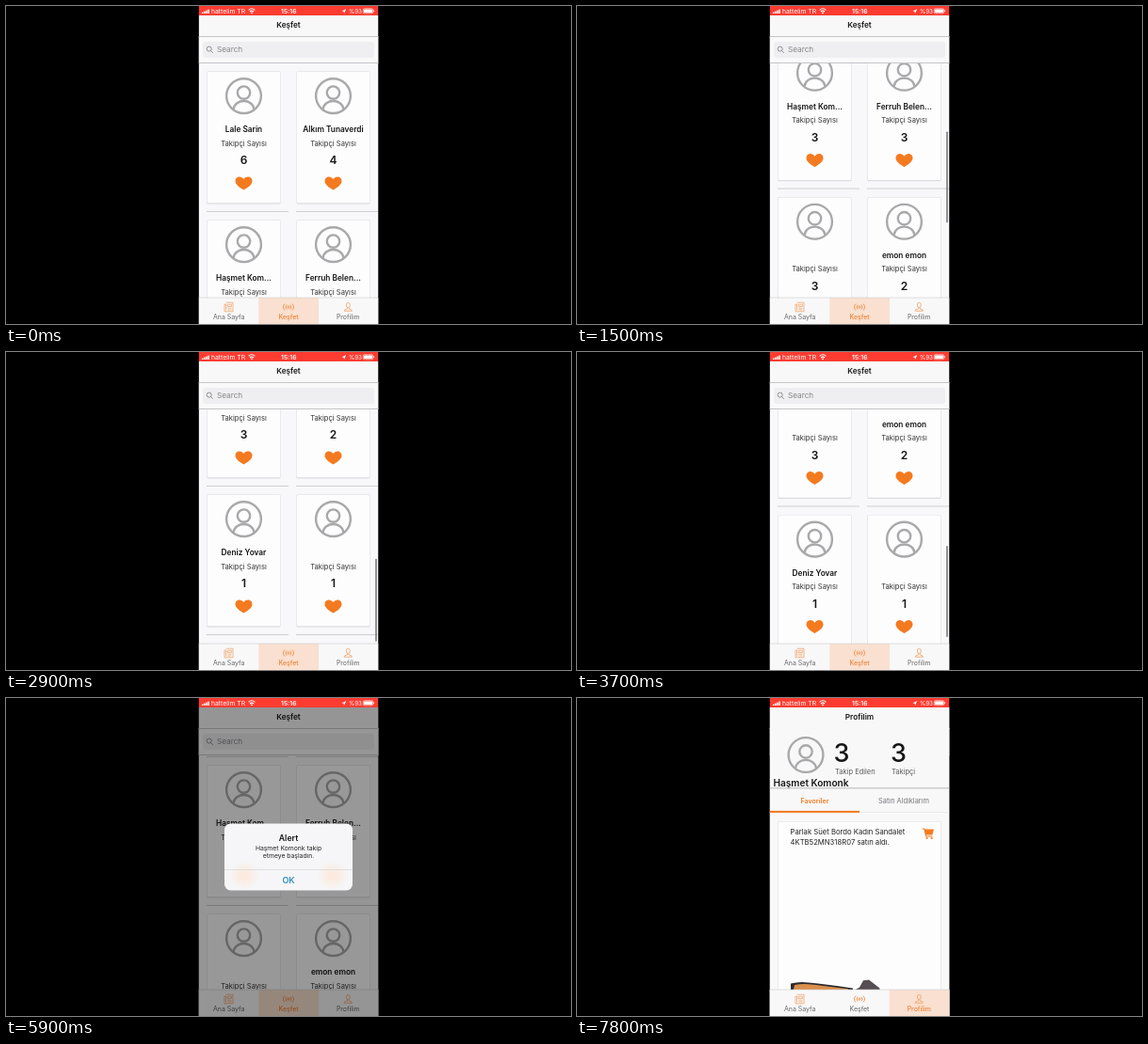
An HTML page that plays this animation: 600 px wide and 338 px high, repeating every 8 s.

```html
<!DOCTYPE html>
<html lang="tr">
<head>
<meta charset="utf-8">
<title>Keşfet</title>
<style>
  html, body { margin: 0; width: 100%; height: 100%; overflow: hidden; background: #000; }
  svg { display: block; width: 600px; height: 338px; font-family: Inter, "Open Sans", sans-serif; }
</style>
</head>
<body>
<svg id="stage" viewBox="0 0 600 338" xmlns="http://www.w3.org/2000/svg"></svg>
<script>
const LOOP = 8000, STEP = 100;
const LEFT = 204.6, WIDTH = 190.9;
const ORANGE = '#f47a1f', INK = '#161616', GRAY = '#5c5c5e', LINE = '#c0c0c2';
const MAX_SCROLL = 383, ROW = 158;
const SCROLL = [[0, 0], [200, 0], [1000, 81], [2000, 287], [2900, 392], [3300, 383], [3600, 383], [4300, 156], [8000, 156]];
const ALERT_IN = 5200, ALERT_OUT = 6300, PROFILE_AT = 7000;

const people = [
  ['Lale Sarin', 6], ['Alkım Tunaverdi', 4],
  ['Haşmet Kom...', 3], ['Ferruh Belen...', 3],
  ['', 3], ['emon emon', 2],
  ['Deniz Yovar', 1], ['', 1]
];

const text = (x, y, s, size, fill = INK, weight = 400, anchor = 'middle') =>
  `<text x="${x}" y="${y}" font-size="${size}" fill="${fill}" font-weight="${weight}" text-anchor="${anchor}">${s}</text>`;
const rect = (x, y, w, h, fill, extra = '') =>
  `<rect x="${x}" y="${y}" width="${w}" height="${h}" fill="${fill}" ${extra}/>`;
const band = (y, h, fill, extra) => rect(LEFT, y, WIDTH, h, fill, extra);
const path = (d, extra = '') => `<path d="${d}" ${extra}/>`;
const group = (body, extra = '') => `<g ${extra}>${body}</g>`;

const avatar = (x, y) => group(
  `<circle r="18.4"/><circle cy="-3.5" r="6.7"/>` + path('M-11 14.4C-9.6 2.4 9.6 2.4 11 14.4'),
  `transform="translate(${x} ${y})" fill="none" stroke="#a9a9ab" stroke-width="2.4"`);

const heart = (x, y) => path(
  'M0 7.2C-4.4 4.6 -9 1.6 -9 -2.4C-9 -7.4 -2.8 -8.4 0 -4.2C2.8 -8.4 9 -7.4 9 -2.4C9 1.6 4.4 4.6 0 7.2Z',
  `transform="translate(${x} ${y})" fill="${ORANGE}"`);

const cardBox = (x, y, w, h) =>
  rect(x - .5, y - .4, w + 1, h + 1.6, '#dcdbdf', 'rx="1.2"') + rect(x, y, w, h, '#fdfdfe', 'rx="1"');

function personCard([name, count], i) {
  const right = i % 2, x = right ? 309 : 214, y = 70 + (i >> 1) * ROW, mid = x + 38.5;
  return cardBox(x, y, 77, 139.3) + avatar(mid, y + 25.6) +
    text(mid, y + 64, name, 8.3, INK, 600) +
    text(mid, y + 78.8, 'Takipçi Sayısı', 7.6, '#333') +
    text(mid, y + 98, count, 12, INK, 600) + heart(mid, y + 118.3) +
    rect(right ? 308 : 213, y + 148, 87, .9, '#cacacc');
}

function statusBar() {
  const bars = [0, 1, 2, 3].map(i => rect(208 + i * 2.1, 6.6 - i, 1.5, 1.4 + i, '#fff')).join('');
  const wifi = path('M257.6 4.3Q261 1.2 264.4 4.3M259 6Q261 4.2 263 6', 'fill="none" stroke="#fff" stroke-width="1.1"') +
    '<circle cx="261" cy="7.3" r=".9" fill="#fff"/>';
  const battery = rect(379.3, 2.8, 10.4, 5, 'none', 'rx="1.2" stroke="#fff" stroke-width=".6"') +
    rect(380, 3.5, 9, 3.6, '#fff', 'rx=".6"') + rect(390.2, 4.4, .9, 1.8, '#fff');
  return band(0, 10, '#fc3c31') + bars + wifi + battery +
    text(218, 7.7, 'hattelim TR', 6.8, '#fff', 400, 'start') +
    text(300.3, 7.7, '15:16', 6.8, '#fff', 600) +
    path('M356.5 5.4L361.3 3L359 8L358.6 5.7Z', 'fill="#fff"') +
    text(364, 7.7, '%93', 6.3, '#fff', 400, 'start');
}

const navBar = title => band(10, 22.5, '#f8f8f9') + text(300, 23.2, title, 8.2, INK, 600);

const searchBar = () =>
  band(32, 29, '#f9f9fa') + band(32, .9, LINE) +
  rect(209, 38, 182, 17, '#efeef0', 'rx="3"') +
  `<circle cx="215.7" cy="45.6" r="2.5" fill="none" stroke="#858589" stroke-width=".9"/>` +
  path('M217.6 47.6L219.8 49.9', 'stroke="#858589" stroke-width=".9"') +
  text(224, 49.4, 'Search', 8.2, '#858589', 400, 'start') +
  band(60, .9, LINE);

function tabBar(active) {
  const icons = [
    path('M233.7 315.2H241V324.8H232V317H233.7V323.5M235.3 317.2H239.4V319.4H235.3ZM235.3 321.2H239.4M235.3 323H239.4', 'stroke-width=".7"'),
    path('M296 316.6Q292.8 320 296 323.4M304 316.6Q307.2 320 304 323.4M298 317.6Q296 320 298 322.4M302 317.6Q304 320 302 322.4', 'stroke-width="1"') +
      '<circle cx="300" cy="320" r="1.1" stroke-width="1"/>',
    '<ellipse cx="363.3" cy="317.9" rx="2" ry="2.6"/>' +
      path('M362.5 320.4V321.8L359.4 323V324.2H367.2V323L364.1 321.8V320.4')
  ];
  const labels = ['Ana Sayfa', 'Keşfet', 'Profilim'];
  return band(310, 28, '#f8f8f9') +
    rect(205 + active * 63.35, 310, 63.8, 28, '#f9e0d0') +
    band(309.7, .6, '#c9c9cb') +
    group(icons.join(''), 'fill="none" stroke="#f19a58" stroke-width=".75"') +
    labels.map((s, i) => text(236.7 + i * 63.3, 333.3, s, 6.95, i === active ? '#ee8438' : '#666668', i === active ? 500 : 400)).join('');
}

const explore = () => band(32, 306, '#f8f7f9') +
  group(people.map(personCard).join(''), 'id="list"') +
  rect(392.2, 63, 1.6, 97, '#77777b', 'id="bar" rx=".8"') +
  navBar('Keşfet') + searchBar() + tabBar(1);

const alertBox = () => band(10, 328, '#000', 'id="dim"') + group(
  rect(232, 133.5, 136, 71, '#f6f6f8', 'rx="6.5"') +
  rect(236, 173, 34, 31, 'url(#glow)') + rect(330, 173, 34, 31, 'url(#glow)') +
  text(300, 151.7, 'Alert', 8.7, INK, 600) +
  text(300, 162, 'Haşmet Komonk takip', 6.8, '#222') +
  text(300, 170, 'etmeye başladın.', 6.8, '#222') +
  rect(232, 182, 136, .6, '#d3d3d6') +
  text(300, 197, 'OK', 9, '#2f8fb8', 600), 'id="alert"');

const cart = () => group(
  path('M366.8 138.4H369.2L369.6 139.4H379L377.4 145.6H370.8L371 146.6H377.6V147.5H370.2L368.4 139.4H366.8Z') +
  '<circle cx="371.6" cy="149" r="1.1"/><circle cx="376.7" cy="149" r="1.1"/>', `fill="${ORANGE}"`);

const shoe = () =>
  path('M227 312V303.4Q236 301 246 302.4Q270 305 293 308.6V312Z', 'fill="#2e2a2e"') +
  path('M229.5 312L231 305Q240 303 252 304.8L288 309.2V312Z', 'fill="#d98f4c"') +
  path('M292 312L300 307.4L304 300.2L310 299.6L321.5 308.6V312Z', 'fill="#554e53"');

const profile = () => band(32, 306, '#f8f8f9') + navBar('Profilim') + avatar(243, 60.5) +
  text(272.6, 67.9, '3', 27, INK, 500, 'start') + text(333, 67.9, '3', 27, INK, 500, 'start') +
  text(274, 81, 'Takip Edilen', 7.5, GRAY, 400, 'start') + text(334, 81, 'Takipçi', 7.5, GRAY, 400, 'start') +
  text(208.5, 93.5, 'Haşmet Komonk', 10.1, INK, 600, 'start') +
  band(95.4, .9, '#b0b0b2') +
  text(252.5, 112, 'Favoriler', 7.1, ORANGE, 600) + text(347, 112, 'Satın Aldıklarım', 7.4, '#77777a') +
  band(121.4, .6, '#e2e2e4') + rect(LEFT, 119.9, 95.4, 2, ORANGE) +
  cardBox(214, 131.4, 172, 200) +
  text(226.5, 145, 'Parlak Süet Bordo Kadın Sandalet', 7.7, '#222', 400, 'start') +
  text(226.5, 155.6, '4KTB52MN318R07 satın aldı.', 7.7, '#222', 400, 'start') +
  cart() + shoe() + tabBar(2);

const $ = id => document.getElementById(id);
$('stage').innerHTML =
  `<defs><clipPath id="screen">${band(0, 338, '#000')}</clipPath>` +
  '<radialGradient id="glow"><stop offset=".2" stop-color="#fbeadd"/><stop offset="1" stop-color="#fbeadd" stop-opacity="0"/></radialGradient></defs>' +
  rect(0, 0, 600, 338, '#000') +
  group(group(explore(), 'id="explore"') + group(alertBox(), 'id="modal"') +
    group(profile(), 'id="profile"') + statusBar(), 'clip-path="url(#screen)"');

const clamp = v => Math.min(1, Math.max(0, v));
const ramp = (t, from, length) => clamp((t - from) / length);
const slope = i => (SCROLL[i + 1][1] - SCROLL[i][1]) / (SCROLL[i + 1][0] - SCROLL[i][0]);

// Smooth speed through each key, without overshoot.
function tangent(i) {
  if (i === 0 || i === SCROLL.length - 1) return 0;
  const a = slope(i - 1), b = slope(i);
  return a * b > 0 ? 2 * a * b / (a + b) : 0;
}

function scrollAt(t) {
  let i = 0;
  while (i < SCROLL.length - 2 && t >= SCROLL[i + 1][0]) i++;
  const [t0, y0] = SCROLL[i], [t1, y1] = SCROLL[i + 1];
  const d = t1 - t0, u = (t - t0) / d, v = 1 - u;
  return y0 * (1 + 2 * u) * v * v + y1 * u * u * (3 - 2 * u) +
    d * (tangent(i) * u * v * v - tangent(i + 1) * u * u * v);
}

function draw(t) {
  const y = scrollAt(t), over = Math.max(0, y - MAX_SCROLL);
  $('list').setAttribute('transform', `translate(0 ${-y.toFixed(2)})`);
  $('bar').setAttribute('y', 63 + (y - over) * .386 + over);
  $('bar').setAttribute('height', 97 - over);
  $('bar').setAttribute('opacity', ramp(t, 100, 200) * (1 - ramp(t, 4200, 300)));

  const shown = ramp(t, ALERT_IN, 300), gone = ramp(t, ALERT_OUT, 300);
  const alpha = shown * (1 - gone), zoom = 1 + .18 * (1 - shown) ** 2;
  $('modal').style.display = alpha > 0 ? '' : 'none';
  $('dim').setAttribute('opacity', .4 * alpha);
  $('alert').setAttribute('opacity', alpha);
  $('alert').setAttribute('transform', `translate(300 169) scale(${zoom}) translate(-300 -169)`);

  $('profile').style.display = t >= PROFILE_AT ? '' : 'none';
}

const start = performance.now();
function tick() {
  const t = (performance.now() - start) % LOOP;
  draw(Math.floor(t / STEP) * STEP);
  requestAnimationFrame(tick);
}
tick();
</script>
</body>
</html>
```
